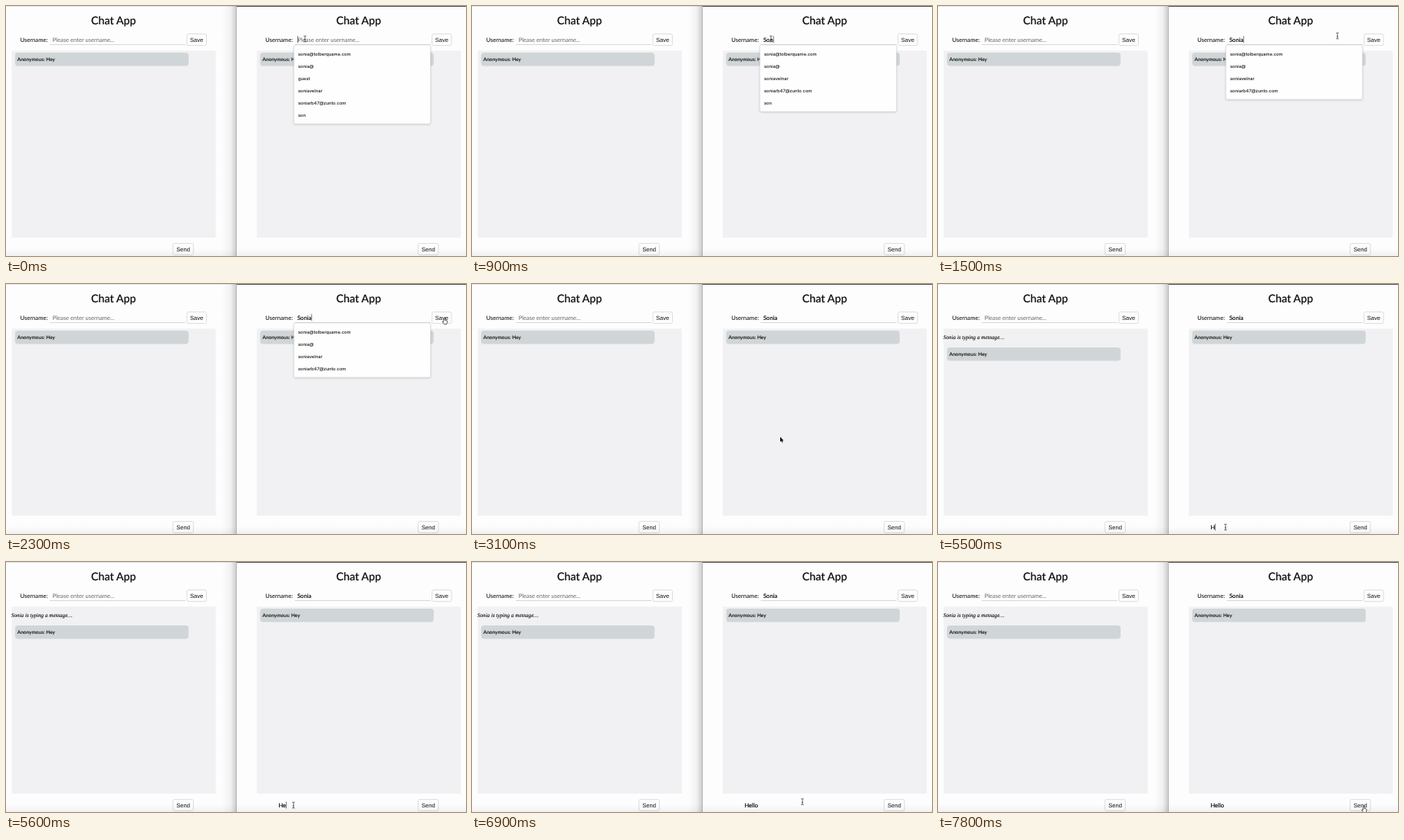
Recreate the animation shown at these times as an HTML page. Size 600 by 327 pixels, loop 8 s.

```html
<!DOCTYPE html>
<html lang="en">
<head>
<meta charset="utf-8">
<title>Chat App</title>
<style>
  html, body { margin: 0; width: 100%; height: 100%; overflow: hidden; background: #fdfdfe; }
  svg { display: block; width: 600px; height: 327px; }
  text { font: 500 7.6px Lato, sans-serif; fill: #111; white-space: pre; text-rendering: geometricPrecision; }
  .title { font-size: 14.3px; stroke: #111; stroke-width: .18px; text-anchor: middle; }
  .hint { font-weight: 400; fill: #666; }
  .typed { fill: #000; stroke: #000; stroke-width: .1px; }
  .msg { font-size: 6.5px; fill: #000; stroke: #000; stroke-width: .06px; }
  .note { font: italic 400 7.1px "Liberation Serif", serif; fill: #000; stroke: #000; stroke-width: .1px; }
  .btn text { font: 400 7.6px "Liberation Sans", sans-serif; text-anchor: middle; }
  .btn rect { fill: #fdfdfd; stroke: #cfcfd1; stroke-width: .7px; }
  .option { font: 500 5.76px Inter, sans-serif; }
</style>
</head>
<body>
<svg id="stage" viewBox="0 0 600 327">
  <defs>
    <linearGradient id="shade">
      <stop offset="0" stop-color="#000" stop-opacity="0"/>
      <stop offset=".6" stop-color="#000" stop-opacity=".045"/>
      <stop offset="1" stop-color="#000" stop-opacity=".2"/>
    </linearGradient>
    <linearGradient id="foot" x2="0" y2="1">
      <stop offset="0" stop-color="#000" stop-opacity="0"/>
      <stop offset="1" stop-color="#000" stop-opacity=".05"/>
    </linearGradient>
    <filter id="soft" x="-10%" y="-10%" width="120%" height="125%">
      <feDropShadow dx="0" dy=".7" stdDeviation="1.1" flood-color="#000" flood-opacity=".22"/>
    </filter>
  </defs>
</svg>
<script>
const LOOP = 8000, STEP = 100, SHIFT = 319.7;
const NAME = 'Sonia', GREETING = 'Hello';
const NAME_KEYS = [600, 800, 900, 1100, 1300];
const GREETING_KEYS = [5300, 5600, 6000, 6100, 6300];
const SAVED = 2500, FOCUSED = 4300, NOTICED = 5500;
const OPTIONS = ['sonia@tolberquame.com', 'sonia@', 'guest', 'soniavelnar', 'soniarb47@zunto.com', 'son'];

// Pointer moves: start, end, target x and y, optional control point
const START = [390, 43];
const MOVES = [
  [1400, 1500, 521, 39],
  [1700, 2300, 572, 44.5, 635, 34],
  [2800, 3100, 402, 200, 530, 130],
  [3200, 3700, 375.5, 311, 402, 250],
  [3800, 4000, 375, 318],
  [6700, 7000, 476, 308, 400, 318],
  [7100, 7800, 555.5, 319.5, 596, 316]
];

const stage = document.getElementById('stage');

function add(parent, tag, attrs = {}, content) {
  const node = document.createElementNS('http://www.w3.org/2000/svg', tag);
  for (const key in attrs) node.setAttribute(key, attrs[key]);
  if (content) node.textContent = content;
  parent.appendChild(node);
  return node;
}
const group = (parent, attrs) => add(parent, 'g', attrs);
const box = (parent, x, y, width, height, fill, rx = 0) =>
  add(parent, 'rect', { x, y, width, height, fill, rx });
const label = (parent, x, y, cls, content) => add(parent, 'text', { x, y, class: cls }, content);
const show = (node, on) => node.setAttribute('visibility', on ? 'visible' : 'hidden');

function button(parent, x, y, width, name) {
  const g = group(parent, { class: 'btn' });
  const face = box(g, x, y, width, 15, '#fdfdfd', 2);
  label(g, x + width / 2, y + 10.1, '', name);
  return face;
}

function buildPane(x) {
  const pane = group(stage, { transform: `translate(${x} 0)` });
  label(pane, 140.3, 24, 'title', 'Chat App');
  label(pane, 18.6, 46.6, '', 'Username:');
  box(pane, 57, 50.2, 177, .7, '#c8c8ca');
  const hint = label(pane, 60.7, 46.6, 'hint', 'Please enter username...');
  const save = button(pane, 236, 36.6, 25.4, 'Save');
  box(pane, 7.5, 58.5, 266, 244.5, '#f1f0f2');
  const bubble = group(pane);
  box(bubble, 11.8, 61, 226.4, 17.6, '#d0d6d8', 4);
  label(bubble, 14.8, 72.1, 'msg', 'Anonymous: Hey');
  button(pane, 217.8, 310.6, 26.6, 'Send');
  return { pane, hint, save, bubble };
}

const left = buildPane(0);
const note = label(left.pane, 7, 72.2, 'note', NAME + ' is typing a message…');
box(stage, 0, 0, 300, .6, '#d4d4d6');
box(stage, 282, 0, 18.5, 327, 'url(#shade)');
box(stage, 300.5, 0, 299.5, 327, '#fdfdfe');
const right = buildPane(SHIFT);
box(stage, 300, 0, 300, 1, '#4a4a4c');
box(stage, 300, 0, .8, 327, '#a9a9ab');
box(stage, 0, 317, 600, 10, 'url(#foot)');

const nameText = label(stage, 380, 46.6, 'typed');
const greetingText = label(stage, 355.4, 320.7, 'typed');

const list = group(stage);
const panel = add(list, 'rect', { x: 375.6, y: 51, width: 178, rx: 1.8, fill: '#fefefe',
  stroke: '#d2d2d4', 'stroke-width': .5, filter: 'url(#soft)' });
const options = OPTIONS.map(o => label(list, 381, 0, 'option', o));

const caret = box(stage, 0, 0, .6, 9, '#222');
const pointer = group(stage);
const shapes = {
  beam: add(pointer, 'path', { d: 'M-1.7-4Q0-4 0-3Q0-4 1.7-4M0-3V3M-1.7 4Q0 4 0 3Q0 4 1.7 4M-.9 .9H.9',
    fill: 'none', stroke: '#222', 'stroke-width': .7 }),
  arrow: add(pointer, 'path', { d: 'M0 0V6.4L1.5 5L2.6 7.5L3.6 7L2.6 4.7H4.5Z',
    fill: '#000', stroke: '#fff', 'stroke-width': .5, 'paint-order': 'stroke' }),
  hand: add(pointer, 'path', { d: 'M-.8 .6a.8 .8 0 0 1 1.6 0V3l2.2 .5q.8 .3 .6 1.2l-.5 2q-.2 .9-.5 1.4h-3q-1.6-1.6-2.4-3.4q.6-.8 1.6 .2z',
    fill: '#fff', stroke: '#111', 'stroke-width': .7 })
};

function pointerAt(t) {
  let [x, y] = START;
  for (const [from, to, tx, ty, cx = (x + tx) / 2, cy = (y + ty) / 2] of MOVES) {
    if (t <= from) break;
    const k = Math.min(1, (t - from) / (to - from)), j = 1 - k;
    x = j * j * x + 2 * j * k * cx + k * k * tx;
    y = j * j * y + 2 * j * k * cy + k * k * ty;
  }
  return [x, y];
}

function pointerKind(x, y) {
  const inside = (x0, y0, x1, y1) => x > x0 && x < x1 && y > y0 && y < y1;
  if (inside(555, 36, 581, 52) || inside(537, 310, 564, 326)) return 'hand';
  if (inside(376, 34, 555, 53) || inside(354, 312, 535, 327)) return 'beam';
  return 'arrow';
}

const typed = (word, keys, t) => word.slice(0, keys.filter(k => k <= t).length);

function drawList(t, prefix) {
  show(list, t < SAVED);
  let rows = 0;
  options.forEach((node, i) => {
    const match = OPTIONS[i].startsWith(prefix.toLowerCase());
    node.style.display = match ? '' : 'none';
    if (match) node.setAttribute('y', 64.7 + 16 * rows++);
  });
  panel.setAttribute('height', 7 + 16 * rows);
}

function drawCaret(t) {
  const inName = t < SAVED;
  const field = inName ? nameText : greetingText;
  const stamps = inName ? [-400, ...NAME_KEYS] : [FOCUSED, ...GREETING_KEYS];
  const last = Math.max(...stamps.filter(s => s <= t));
  const width = field.textContent ? field.getComputedTextLength() : 0;
  caret.setAttribute('x', +field.getAttribute('x') + width + .2);
  caret.setAttribute('y', inName ? 39.2 : 313.5);
  show(caret, (inName || t >= FOCUSED) && (t - last) % 1000 < 500);
}

function draw(time) {
  const t = Math.floor((time % LOOP) / STEP) * STEP;
  const name = typed(NAME, NAME_KEYS, t);
  nameText.textContent = name;
  greetingText.textContent = typed(GREETING, GREETING_KEYS, t);
  show(right.hint, !name);
  right.save.style.fill = t === SAVED ? '#eeeef0' : '';
  drawList(t, name);
  drawCaret(t);

  show(note, t >= NOTICED);
  left.bubble.setAttribute('transform', `translate(0 ${t >= NOTICED ? 22 : 0})`);

  const [x, y] = pointerAt(t), kind = pointerKind(x, y);
  pointer.setAttribute('transform', `translate(${x} ${y})`);
  for (const key in shapes) show(shapes[key], key === kind);
}

const begin = performance.now();
function tick() {
  draw(performance.now() - begin);
  requestAnimationFrame(tick);
}
tick();
</script>
</body>
</html>
```
